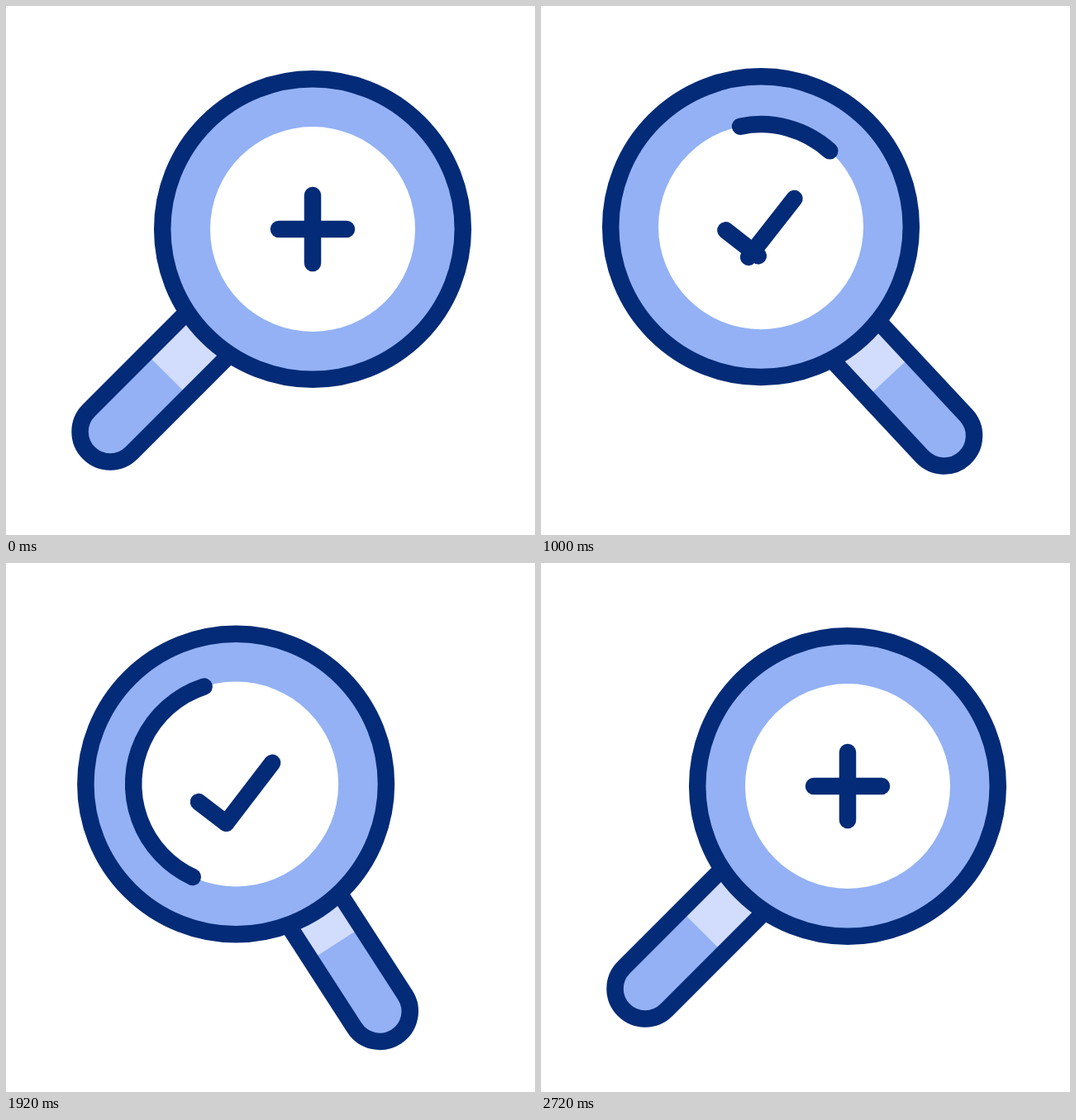
Animation, 640 px wide and 640 px high, one loop 3000 ms. Source, as an HTML page with a canvas:

```html
<!DOCTYPE html>
<html lang="en">
<head>
<meta charset="utf-8">
<title>Magnifier</title>
<style>
html, body { margin: 0; width: 100%; height: 100%; overflow: hidden; background: #fff; }
canvas { display: block; }
</style>
</head>
<body>
<canvas id="stage" width="640" height="640"></canvas>
<script>
const ctx = document.getElementById('stage').getContext('2d');
const NAVY = '#032b77', MID = '#93b1f4', LIGHT = '#d2dcfd';
const LOOP = 3000, STEP = 40, RAD = Math.PI / 180;

const mix = (a, b, p) => a + (b - a) * p;

// Progress from time a to b, eased by cubic-bezier(x1, 0, x2, 1)
function ease(t, a, b, x1, x2) {
  const x = (t - a) / (b - a);
  if (x <= 0) return 0;
  if (x >= 1) return 1;
  let lo = 0, hi = 1, s;
  for (let i = 0; i < 24; i++) {
    s = (lo + hi) / 2;
    const bx = 3 * (1 - s) * s * ((1 - s) * x1 + s * x2) + s * s * s;
    if (bx < x) lo = s; else hi = s;
  }
  return s * s * (3 - 2 * s);
}

function disc(r, fill, stroke) {
  ctx.beginPath();
  ctx.arc(0, 0, r, 0, 7);
  ctx.fillStyle = fill;
  ctx.fill();
  if (stroke) ctx.stroke();
}

function line(x1, y1, x2, y2) {
  ctx.beginPath();
  ctx.moveTo(x1, y1);
  ctx.lineTo(x2, y2);
  ctx.stroke();
}

function handle(x, y, angle) {
  ctx.save();
  ctx.translate(x, y);
  ctx.rotate(angle * RAD);
  ctx.beginPath();
  ctx.moveTo(36.5, 0);
  ctx.lineTo(36.5, 206);
  ctx.arc(0, 206, 36.5, 0, Math.PI);
  ctx.lineTo(-36.5, 0);
  ctx.fillStyle = MID;
  ctx.fill();
  ctx.fillStyle = LIGHT;
  ctx.fillRect(-36.5, 0, 73, 108.5);
  ctx.stroke();
  ctx.restore();
}

// A plus that turns (turn) and rearranges its bars into a check mark (morph)
function mark(y, turn, morph) {
  ctx.save();
  ctx.translate(0, y);
  ctx.rotate(-52.5 * turn * RAD);
  const at = (a, b) => mix(a, b, morph);
  line(at(-41, -37.2), at(0, 13.6), at(41, 54.6), at(0, 13.6));
  line(at(0, -37.2), at(-41, -28.4), at(0, -37.2), at(41, 13.6));
  ctx.restore();
}

function draw(t) {
  const go = ease(t, 240, 1320, .58, .06);
  const back = ease(t, 1630, 2710, .58, .06);
  const swing = go - back;
  const slide = ease(t, 240, 1320, .52, .25) - ease(t, 1630, 2710, .52, .25);

  ctx.clearRect(0, 0, 640, 640);
  ctx.lineWidth = 20.5;
  ctx.lineCap = ctx.lineJoin = 'round';
  ctx.strokeStyle = NAVY;

  handle(mix(271.7, 353, slide), 369.3, mix(45, -47.2, swing));

  ctx.save();
  ctx.translate(mix(371, 261, swing), mix(270, 267, swing));
  disc(181.8, MID, true);
  disc(124, '#fff');

  // Check drops out of the glass while a new plus follows from above
  const drop = 250 * ease(t, 1720, 2720, .7, .2);
  ctx.save();
  ctx.beginPath();
  ctx.arc(0, 0, 124, 0, 7);
  ctx.clip();
  mark(drop, ease(t, 430, 1090, .6, .2), ease(t, 690, 1210, .6, .3));
  if (drop) mark(drop - 250, 0, 0);
  ctx.restore();

  // Progress ring, drawn and then erased anticlockwise
  const drawn = ease(t, 770, 1560, .5, .5);
  const erased = ease(t, 1560, 2480, .3, .245);
  if (drawn - erased > .0005) {
    const base = mix(40.2, -52, go) + 360 * ease(t, 1500, 2560, .2, .59);
    ctx.beginPath();
    ctx.arc(0, 0, 124, (base - 360 * drawn) * RAD, (base - 360 * erased) * RAD);
    ctx.stroke();
  }
  ctx.restore();
}

function frame() {
  const t = performance.now() % LOOP;
  draw(t - t % STEP);
  requestAnimationFrame(frame);
}
frame();
</script>
</body>
</html>
```
